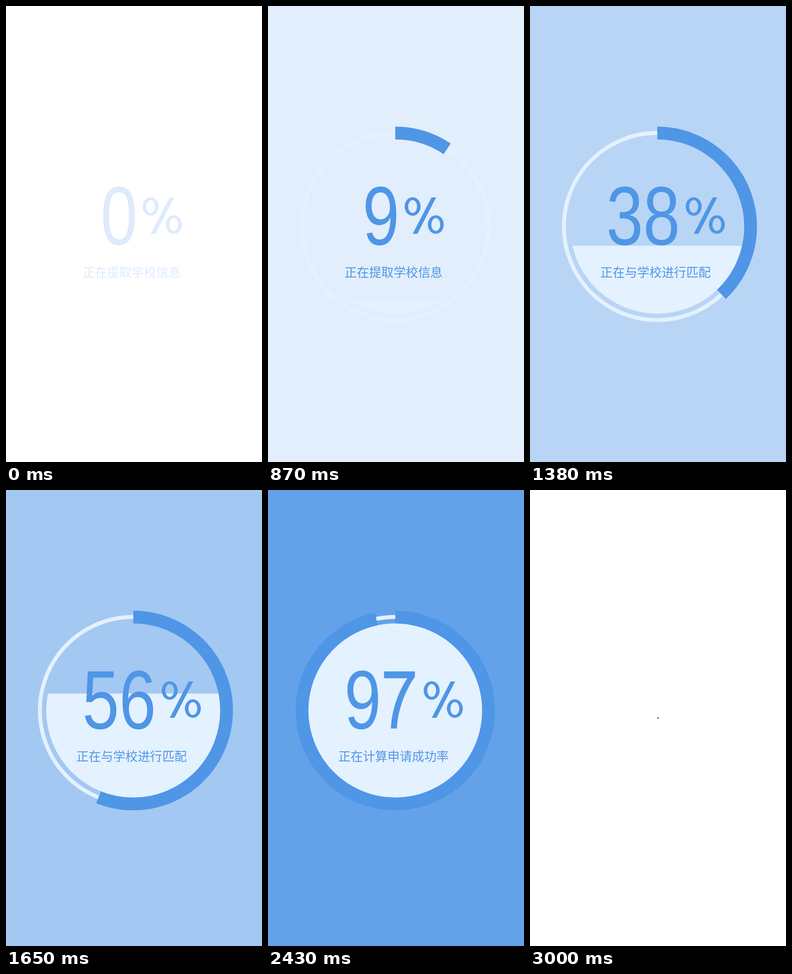
Recreate the animation shown at these times as an HTML page with a canvas. Size 561 by 998 pixels, loop 3.03 s.

```html
<!DOCTYPE html>
<html lang="zh">
<head>
<meta charset="utf-8">
<title>Progress</title>
<style>
html, body { margin: 0; width: 100%; height: 100%; overflow: hidden; background: #fff; }
canvas { display: block; }
</style>
</head>
<body>
<canvas id="stage" width="561" height="998"></canvas>
<script>
const W = 561, H = 998, LOOP = 3030, STEP = 30;
const CX = 278.9, CY = 482.6, DISC = 190.6;
const BLUE = '#4f96e6', LIGHT = '#e4f1ff';
const SHRINK = 2700;
const ctx = document.getElementById('stage').getContext('2d');

const clamp = v => Math.max(0, Math.min(1, v));
const ramp = (t, from, to) => clamp((t - from) / (to - from));
const smooth = u => u * u * (3 - 2 * u);
const mix = (a, b, u) => a + (b - a) * u;

function disc(x, y, r, color) {
  ctx.beginPath();
  ctx.arc(x, y, Math.max(0, r), 0, Math.PI * 2);
  ctx.fillStyle = color;
  ctx.fill();
}

function ring(r, width, part, color) {
  if (part <= 0) return;
  ctx.beginPath();
  ctx.arc(CX, CY, r, -Math.PI / 2, (part * 2 - 0.5) * Math.PI);
  ctx.lineWidth = width;
  ctx.strokeStyle = color;
  ctx.stroke();
}

// Footless "1" and curved "7", in units of 1/2048 em
const SHAPES = {
  1: new Path2D('M763 0H583V-1147Q518-1085 412.5-1023 307-961 223-930V-1104' +
    'Q374-1175 487-1276 600-1377 647-1472H763Z'),
  7: new Path2D('M90-1274V-1447H1046V-1307Q906-1158 768-911 631-664 556-403' +
    'Q502-219 487 0H302Q305-173 370-418 435-663 556-890 678-1118 815-1273Z')
};

function digit(ch, x) {
  ctx.save();
  ctx.translate(x, 522);
  if (SHAPES[ch]) {
    ctx.scale(145 / 2048, 177 / 2048);
    ctx.fill(SHAPES[ch]);
  } else {
    ctx.scale(0.797, 1);
    ctx.font = '182px "Liberation Sans", Arial, sans-serif';
    ctx.fillText(ch, 0, 0);
  }
  ctx.restore();
}

function percent(x) {
  const oval = (cx, cy) => {
    ctx.beginPath();
    ctx.ellipse(cx, cy, 17.5, 20.3, 0, 0, Math.PI * 2);
    ctx.ellipse(cx, cy, 9.8, 14, 0, 0, Math.PI * 2);
    ctx.fill('evenodd');
  };
  oval(x + 17.5, 438.8);
  oval(x + 68.3, 478.3);
  ctx.beginPath();
  ctx.moveTo(x + 59, 419);
  ctx.lineTo(x + 69, 419);
  ctx.lineTo(x + 28, 498.5);
  ctx.lineTo(x + 17.7, 498.5);
  ctx.fill();
}

function label(value, t) {
  const digits = String(value);
  const n = digits.length;
  const left = [207.3, 167.2, 126.5][n - 1];
  ctx.fillStyle = BLUE;
  ctx.textAlign = 'left';
  [...digits].forEach((d, i) => digit(d, left + i * 80.7));
  percent([299.4, 341.2, 374.7][n - 1]);

  const task = t < 1110 ? '正在提取学校信息' : t < 2100 ? '正在与学校进行匹配' : '正在计算申请成功率';
  ctx.font = '300 26.9px "Noto Sans CJK SC", "Noto Sans CJK", sans-serif';
  ctx.textAlign = 'center';
  ctx.fillText(task, 275.2, 592.5);
}

function load(t) {
  const part = smooth(ramp(t, 450, 2670));
  const level = 674.5 - 440 * smooth(ramp(t, 510, 2730));
  const fade = ramp(t, 0, 450);

  ctx.globalAlpha = ramp(t, 510, 2690);
  ctx.fillStyle = BLUE;
  ctx.fillRect(0, 0, W, H);

  ctx.globalAlpha = fade;
  ring(204.75, 8.5, 1, LIGHT);
  ctx.save();
  ctx.beginPath();
  ctx.rect(0, level, W, H);
  ctx.clip();
  disc(CX, CY, DISC, LIGHT);
  ctx.restore();
  ring(204.5, 28, part, BLUE);
  ctx.globalAlpha = mix(0.19, 1, fade);
  label(Math.round(part * 100), t);
  ctx.globalAlpha = 1;
}

function shrink(t) {
  const u = ramp(t, SHRINK, 3000);
  const r = mix(652, 2.2, u);
  disc(280.5 + r * 0.0033, 499 - r * 0.0133, r, BLUE);

  ctx.save();
  disc(mix(CX, 276.5, u), mix(CY, 498.5, u), DISC - 193.1 * u, LIGHT);
  ctx.clip();
  label(100, t);
  ctx.restore();
}

function draw(now) {
  const t = Math.floor((now % LOOP) / STEP) * STEP;
  ctx.fillStyle = '#fff';
  ctx.fillRect(0, 0, W, H);
  if (t <= SHRINK) load(t);
  else shrink(t);
}

const start = performance.now();
function tick() {
  draw(performance.now() - start);
  requestAnimationFrame(tick);
}
tick();
</script>
</body>
</html>
```
